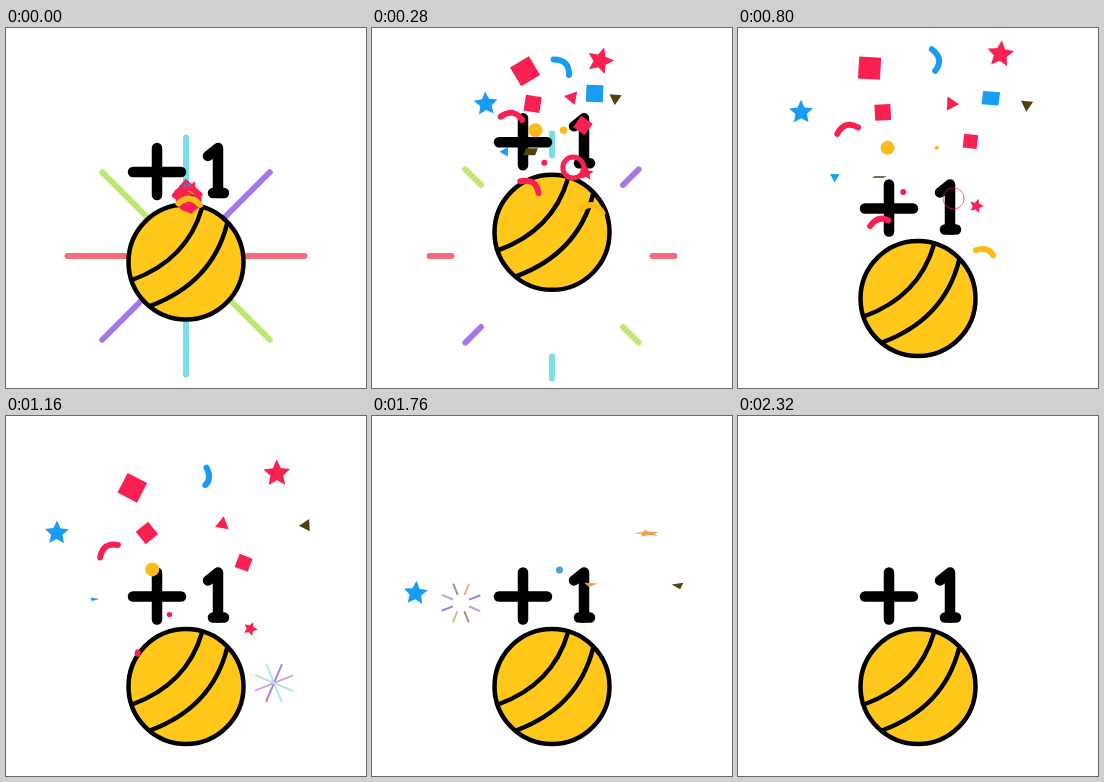
These frames come from a looping animation (360x360 px, 3000 ms). An HTML page with a canvas:

```html
<!DOCTYPE html>
<html lang="en">
<head>
<meta charset="utf-8">
<title>Plus one</title>
<style>
  html, body { margin: 0; width: 100%; height: 100%; overflow: hidden; background: #fff; }
  canvas { display: block; width: 360px; height: 360px; }
</style>
</head>
<body>
<canvas id="stage" width="360" height="360"></canvas>
<script>
const ctx = document.getElementById('stage').getContext('2d');
const LOOP = 3000, STEP = 40, PEAK = 520;
const RED = '#fa2052', BLUE = '#179df6', GOLD = '#fbbc19', OLIVE = '#51410f';
const TAU = Math.PI * 2, RAD = Math.PI / 180;

// kind, x and y at PEAK, size, colour, end of life, angle at PEAK, degrees per ms
const pieces = [
  ['star', 249, 14, 14, RED, 1870, 12, -.02],
  ['arc', 196, 19, 11, BLUE, 1500, 60, .07],
  ['square', 140, 27, 22, RED, 1640, -15, .066],
  ['star', 83, 68, 12.5, BLUE, 2210, -2, .005],
  ['square', 151, 68, 16, RED, 1640, 45, .15],
  ['triangle', 208, 60, 8, RED, 1900, 95, .1],
  ['square', 241, 55, 17, BLUE, 1150, 45, .18],
  ['triangle', 271, 61, 7, OLIVE, 2010, -90, .23],
  ['square', 224, 95, 14, RED, 1640, 15, .29],
  ['dot', 155, 101, 7, GOLD, 1640, 0, 0],
  ['dot', 196, 101, 3.8, GOLD, 1050, 0, 0],
  ['arc', 121, 82, 11, RED, 1640, -5, -.05],
  ['triangle', 111, 128, 5.5, BLUE, 1320, 75, .06],
  ['slab', 148, 128, 12, OLIVE, 900, 0, 0],
  ['dot', 168, 142, 3, RED, 1560, 0, 0],
  ['ring', 210, 148, 10.5, RED, 900, 0, 0],
  ['star', 229, 155, 7.5, RED, 1600, 10, .02],
  ['arc', 149, 169, 11, RED, 1180, 12, -.08],
  ['arc', 238, 198, 11, GOLD, 1155, 18, .03]
];

const clamp = v => Math.max(0, Math.min(1, v));
const mix = (a, b, p) => a + (b - a) * p;
const wave = p => (1 - Math.cos(Math.PI * clamp(p))) / 2;
const spread = (t, rate) => (1 - Math.exp(-rate * (t + 8))) / (1 - Math.exp(-rate * (PEAK + 8)));

function line(points, color, width) {
  ctx.beginPath();
  points.forEach(p => ctx.lineTo(...p));
  ctx.strokeStyle = color;
  ctx.lineWidth = width;
  ctx.stroke();
}

function polygon(corners, radius, inner = radius) {
  ctx.beginPath();
  for (let i = 0; i < corners; i++) {
    const r = i % 2 ? inner : radius, a = i * TAU / corners;
    ctx.lineTo(r * Math.cos(a), r * Math.sin(a));
  }
  ctx.closePath();
  ctx.fill();
}

function circle(x, y, r) {
  ctx.beginPath();
  ctx.arc(x, y, r, 0, TAU);
}

function burst(x, y, radius, width, turn, colors, t) {
  if (t < -160 || t > 560) return;
  const outer = radius * (t < 0 ? .94 * (1 + t / 160) : .94 + .06 * clamp(t / PEAK));
  const inner = Math.min(outer, radius * (1 - (1 - clamp(t / 560)) ** 2.3));
  for (let i = 0; i < 8; i++) {
    const a = (turn + i * 45) * RAD, c = Math.cos(a), s = Math.sin(a);
    line([[x + inner * c, y + inner * s], [x + outer * c, y + outer * s]], colors[i % 4], width);
  }
}

function rise(t) {
  if (t < 220) return mix(-36.5, -74, Math.sin(t / 220 * Math.PI / 2));
  if (t < PEAK) return mix(-74, 8, wave((t - 220) / 300));
  return mix(8, 0, wave((t - PEAK) / 240));
}

function ball(y) {
  ctx.save();
  ctx.translate(180, y);
  circle(0, 0, 57.5);
  ctx.fillStyle = '#ffc81a';
  ctx.fill();
  ctx.moveTo(16, -54);
  ctx.quadraticCurveTo(1, -2, -54, 18);
  ctx.moveTo(41, -38);
  ctx.quadraticCurveTo(26, 21, -36, 44);
  ctx.strokeStyle = '#000';
  ctx.lineWidth = 4.5;
  ctx.stroke();
  ctx.restore();
}

function plusOne(y) {
  line([[127, y], [175, y]], '#000', 10.5);
  line([[151, y - 24], [151, y + 23]], '#000', 10.5);
  line([[202, y - 16], [212, y - 24], [212, y + 21]], '#000', 10.5);
  line([[207, y + 21], [218, y + 21]], '#000', 10.5);
}

function confetti([kind, px, py, size, color, end, angle, spin], t) {
  if (t >= end) return;
  const left = clamp((end - t) / 450), fall = .102;
  const x = 182 + (px - 182) * spread(t, .0023);
  const y = 174 + (py - 174 - fall * PEAK) * spread(t, .0044) + fall * t;
  const late = color === RED ? clamp((t - 1500) / 260) : 0;
  ctx.save();
  ctx.translate(x, y);
  if (kind === 'dot') ctx.scale(left, left);
  else if (kind !== 'arc' && kind !== 'ring') ctx.scale(1, left);
  ctx.rotate((angle + spin * (t - PEAK)) * RAD);
  ctx.fillStyle = late ? `rgb(${mix(250, 240, late)},${mix(32, 160, late)},${mix(82, 80, late)})` : color;
  ctx.strokeStyle = color;
  if (kind === 'star') {
    ctx.rotate(-Math.PI / 2);
    polygon(10, size, size * .48);
  } else if (kind === 'triangle') {
    polygon(3, size);
  } else if (kind === 'square') {
    ctx.fillRect(-size / 2, -size / 2, size, size);
  } else if (kind === 'slab') {
    ctx.transform(1, 0, -.4, 1, 0, 0);
    ctx.fillRect(-size / 2, -3.5, size, 7);
  } else if (kind === 'arc') {
    ctx.beginPath();
    ctx.moveTo(-size, 3);
    ctx.quadraticCurveTo(1, -8, size, 4);
    ctx.lineWidth = 6;
    ctx.setLineDash([25 * left, 99]);
    ctx.stroke();
  } else {
    circle(0, 0, size);
    ctx.lineWidth = 2 * Math.exp((PEAK - t) / 260);
    if (kind === 'dot') ctx.fill();
    else {
      ctx.lineWidth = Math.min(5, ctx.lineWidth);
      ctx.stroke();
    }
  }
  ctx.restore();
}

function draw(t) {
  ctx.fillStyle = '#fff';
  ctx.fillRect(0, 0, 360, 360);
  ctx.lineCap = ctx.lineJoin = 'round';
  burst(180, 228, 126, 6, 0, ['#f56d78', '#bfe872', '#78dfe8', '#a876ea'], t);
  const shift = rise(t);
  ball(270.5 + shift);
  plusOne(180.5 + shift);
  pieces.forEach(piece => confetti(piece, t));
  burst(268, 267, 21, 2, -22, ['#dfa3d3', '#b4e6e6', '#b4e6e6', '#b07fd6'], t - 1140);
  burst(89, 187, 21, 2, -22, ['#9a80d8', '#b9a0e0', '#a89080', '#f0b080'], t - 1630);
  const glow = 1 - Math.abs(t - 1760) / 140;
  if (glow > 0) {
    circle(187.5, 154, 3.5 * glow);
    ctx.fillStyle = '#479fe0';
    ctx.fill();
  }
}

function tick() {
  const t = performance.now() % LOOP;
  draw(Math.floor(t / STEP) * STEP);
  requestAnimationFrame(tick);
}
tick();
</script>
</body>
</html>
```
